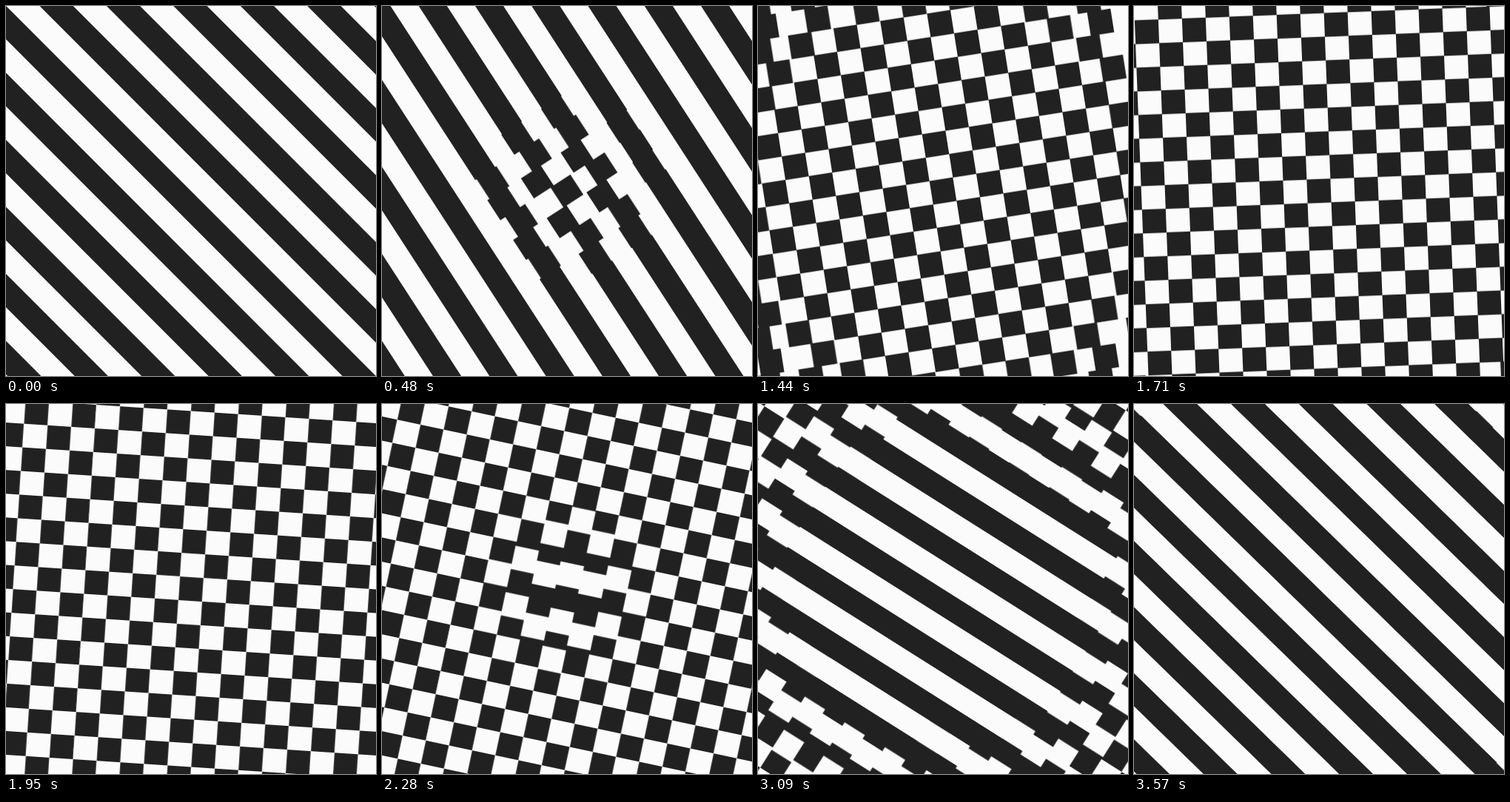
An HTML page without scripts that plays this animation: 500 by 500 pixels, repeating every 3.6 s.

```html
<!DOCTYPE html>
<html lang="en">
<head>
<meta charset="utf-8">
<title>Stripes and checks</title>
<style>
  html, body { margin: 0; width: 100%; height: 100%; overflow: hidden; background: #fbfbfb; }
  svg { display: block; width: 100vw; height: 100vh; }

  .turn { animation: turn 3600ms linear infinite; }
  .second { animation: second 3600ms step-end infinite; }
  .ground { fill: #212121; }
  .flip { transform: matrix(0, 1, 1, 0, 0, 0); }

  @keyframes turn { from { transform: rotate(-45deg); } to { transform: rotate(45deg); } }
  @keyframes second { 0% { opacity: 0; } 50%, 100% { opacity: 1; } }

  /* Alternate rows slide in opposite directions; --odd offsets a row by one cell. */
  .dark { fill: #212121; --start: 0ms; }
  .dark g { --odd: 1; --from: 16px; --to: 0px; }
  .dark g:nth-child(even) { --odd: 0; --from: -16px; }
  .light { fill: #fbfbfb; --start: 1800ms; }
  .light g { --odd: 0; --from: 0px; --to: -16px; }
  .light g:nth-child(even) { --odd: 1; --to: 16px; }

  /* The slide spreads outwards from the centre; cells overlap slightly to hide seams. */
  .board rect {
    --x: calc((var(--col) + var(--odd)) * 32px - 16px);
    x: var(--x);
    y: calc(var(--row) * 32px - 16.2px);
    width: 32px;
    height: 32.4px;
    animation: slide 3600ms infinite;
    animation-delay: calc(hypot(var(--col) + var(--odd), var(--row)) * 122ms + var(--start) - 7200ms);
  }
  @keyframes slide {
    0% { x: calc(var(--x) + var(--from)); animation-timing-function: cubic-bezier(.3333, 0, .6667, .3333); }
    7.1% { x: calc(var(--x) + (var(--from) + var(--to)) / 2); animation-timing-function: cubic-bezier(.3333, .6667, .6667, 1); }
    14.2% { x: calc(var(--x) + var(--to)); animation-timing-function: step-end; }
    50%, 100% { x: calc(var(--x) + var(--from)); }
  }

  rect:nth-child(1) { --col: -12; }
  rect:nth-child(2) { --col: -10; }
  rect:nth-child(3) { --col: -8; }
  rect:nth-child(4) { --col: -6; }
  rect:nth-child(5) { --col: -4; }
  rect:nth-child(6) { --col: -2; }
  rect:nth-child(7) { --col: 0; }
  rect:nth-child(8) { --col: 2; }
  rect:nth-child(9) { --col: 4; }
  rect:nth-child(10) { --col: 6; }
  rect:nth-child(11) { --col: 8; }
  rect:nth-child(12) { --col: 10; }
  rect:nth-child(13) { --col: 12; }
</style>
</head>
<body>
<svg viewBox="-250 -250 500 500">
<g class="turn">
<g class="board dark">
<g style="--row:-11"><rect/><rect/><rect/><rect/><rect/><rect/><rect/><rect/><rect/><rect/><rect/><rect/><rect/></g>
<g style="--row:-10"><rect/><rect/><rect/><rect/><rect/><rect/><rect/><rect/><rect/><rect/><rect/><rect/><rect/></g>
<g style="--row:-9"><rect/><rect/><rect/><rect/><rect/><rect/><rect/><rect/><rect/><rect/><rect/><rect/><rect/></g>
<g style="--row:-8"><rect/><rect/><rect/><rect/><rect/><rect/><rect/><rect/><rect/><rect/><rect/><rect/><rect/></g>
<g style="--row:-7"><rect/><rect/><rect/><rect/><rect/><rect/><rect/><rect/><rect/><rect/><rect/><rect/><rect/></g>
<g style="--row:-6"><rect/><rect/><rect/><rect/><rect/><rect/><rect/><rect/><rect/><rect/><rect/><rect/><rect/></g>
<g style="--row:-5"><rect/><rect/><rect/><rect/><rect/><rect/><rect/><rect/><rect/><rect/><rect/><rect/><rect/></g>
<g style="--row:-4"><rect/><rect/><rect/><rect/><rect/><rect/><rect/><rect/><rect/><rect/><rect/><rect/><rect/></g>
<g style="--row:-3"><rect/><rect/><rect/><rect/><rect/><rect/><rect/><rect/><rect/><rect/><rect/><rect/><rect/></g>
<g style="--row:-2"><rect/><rect/><rect/><rect/><rect/><rect/><rect/><rect/><rect/><rect/><rect/><rect/><rect/></g>
<g style="--row:-1"><rect/><rect/><rect/><rect/><rect/><rect/><rect/><rect/><rect/><rect/><rect/><rect/><rect/></g>
<g style="--row:0"><rect/><rect/><rect/><rect/><rect/><rect/><rect/><rect/><rect/><rect/><rect/><rect/><rect/></g>
<g style="--row:1"><rect/><rect/><rect/><rect/><rect/><rect/><rect/><rect/><rect/><rect/><rect/><rect/><rect/></g>
<g style="--row:2"><rect/><rect/><rect/><rect/><rect/><rect/><rect/><rect/><rect/><rect/><rect/><rect/><rect/></g>
<g style="--row:3"><rect/><rect/><rect/><rect/><rect/><rect/><rect/><rect/><rect/><rect/><rect/><rect/><rect/></g>
<g style="--row:4"><rect/><rect/><rect/><rect/><rect/><rect/><rect/><rect/><rect/><rect/><rect/><rect/><rect/></g>
<g style="--row:5"><rect/><rect/><rect/><rect/><rect/><rect/><rect/><rect/><rect/><rect/><rect/><rect/><rect/></g>
<g style="--row:6"><rect/><rect/><rect/><rect/><rect/><rect/><rect/><rect/><rect/><rect/><rect/><rect/><rect/></g>
<g style="--row:7"><rect/><rect/><rect/><rect/><rect/><rect/><rect/><rect/><rect/><rect/><rect/><rect/><rect/></g>
<g style="--row:8"><rect/><rect/><rect/><rect/><rect/><rect/><rect/><rect/><rect/><rect/><rect/><rect/><rect/></g>
<g style="--row:9"><rect/><rect/><rect/><rect/><rect/><rect/><rect/><rect/><rect/><rect/><rect/><rect/><rect/></g>
<g style="--row:10"><rect/><rect/><rect/><rect/><rect/><rect/><rect/><rect/><rect/><rect/><rect/><rect/><rect/></g>
<g style="--row:11"><rect/><rect/><rect/><rect/><rect/><rect/><rect/><rect/><rect/><rect/><rect/><rect/><rect/></g>
</g>
<g class="second">
<rect class="ground" x="-400" y="-400" width="800" height="800"/>
<g class="board light flip">
<g style="--row:-11"><rect/><rect/><rect/><rect/><rect/><rect/><rect/><rect/><rect/><rect/><rect/><rect/><rect/></g>
<g style="--row:-10"><rect/><rect/><rect/><rect/><rect/><rect/><rect/><rect/><rect/><rect/><rect/><rect/><rect/></g>
<g style="--row:-9"><rect/><rect/><rect/><rect/><rect/><rect/><rect/><rect/><rect/><rect/><rect/><rect/><rect/></g>
<g style="--row:-8"><rect/><rect/><rect/><rect/><rect/><rect/><rect/><rect/><rect/><rect/><rect/><rect/><rect/></g>
<g style="--row:-7"><rect/><rect/><rect/><rect/><rect/><rect/><rect/><rect/><rect/><rect/><rect/><rect/><rect/></g>
<g style="--row:-6"><rect/><rect/><rect/><rect/><rect/><rect/><rect/><rect/><rect/><rect/><rect/><rect/><rect/></g>
<g style="--row:-5"><rect/><rect/><rect/><rect/><rect/><rect/><rect/><rect/><rect/><rect/><rect/><rect/><rect/></g>
<g style="--row:-4"><rect/><rect/><rect/><rect/><rect/><rect/><rect/><rect/><rect/><rect/><rect/><rect/><rect/></g>
<g style="--row:-3"><rect/><rect/><rect/><rect/><rect/><rect/><rect/><rect/><rect/><rect/><rect/><rect/><rect/></g>
<g style="--row:-2"><rect/><rect/><rect/><rect/><rect/><rect/><rect/><rect/><rect/><rect/><rect/><rect/><rect/></g>
<g style="--row:-1"><rect/><rect/><rect/><rect/><rect/><rect/><rect/><rect/><rect/><rect/><rect/><rect/><rect/></g>
<g style="--row:0"><rect/><rect/><rect/><rect/><rect/><rect/><rect/><rect/><rect/><rect/><rect/><rect/><rect/></g>
<g style="--row:1"><rect/><rect/><rect/><rect/><rect/><rect/><rect/><rect/><rect/><rect/><rect/><rect/><rect/></g>
<g style="--row:2"><rect/><rect/><rect/><rect/><rect/><rect/><rect/><rect/><rect/><rect/><rect/><rect/><rect/></g>
<g style="--row:3"><rect/><rect/><rect/><rect/><rect/><rect/><rect/><rect/><rect/><rect/><rect/><rect/><rect/></g>
<g style="--row:4"><rect/><rect/><rect/><rect/><rect/><rect/><rect/><rect/><rect/><rect/><rect/><rect/><rect/></g>
<g style="--row:5"><rect/><rect/><rect/><rect/><rect/><rect/><rect/><rect/><rect/><rect/><rect/><rect/><rect/></g>
<g style="--row:6"><rect/><rect/><rect/><rect/><rect/><rect/><rect/><rect/><rect/><rect/><rect/><rect/><rect/></g>
<g style="--row:7"><rect/><rect/><rect/><rect/><rect/><rect/><rect/><rect/><rect/><rect/><rect/><rect/><rect/></g>
<g style="--row:8"><rect/><rect/><rect/><rect/><rect/><rect/><rect/><rect/><rect/><rect/><rect/><rect/><rect/></g>
<g style="--row:9"><rect/><rect/><rect/><rect/><rect/><rect/><rect/><rect/><rect/><rect/><rect/><rect/><rect/></g>
<g style="--row:10"><rect/><rect/><rect/><rect/><rect/><rect/><rect/><rect/><rect/><rect/><rect/><rect/><rect/></g>
<g style="--row:11"><rect/><rect/><rect/><rect/><rect/><rect/><rect/><rect/><rect/><rect/><rect/><rect/><rect/></g>
</g>
</g>
</g>
</svg>
</body>
</html>
```
